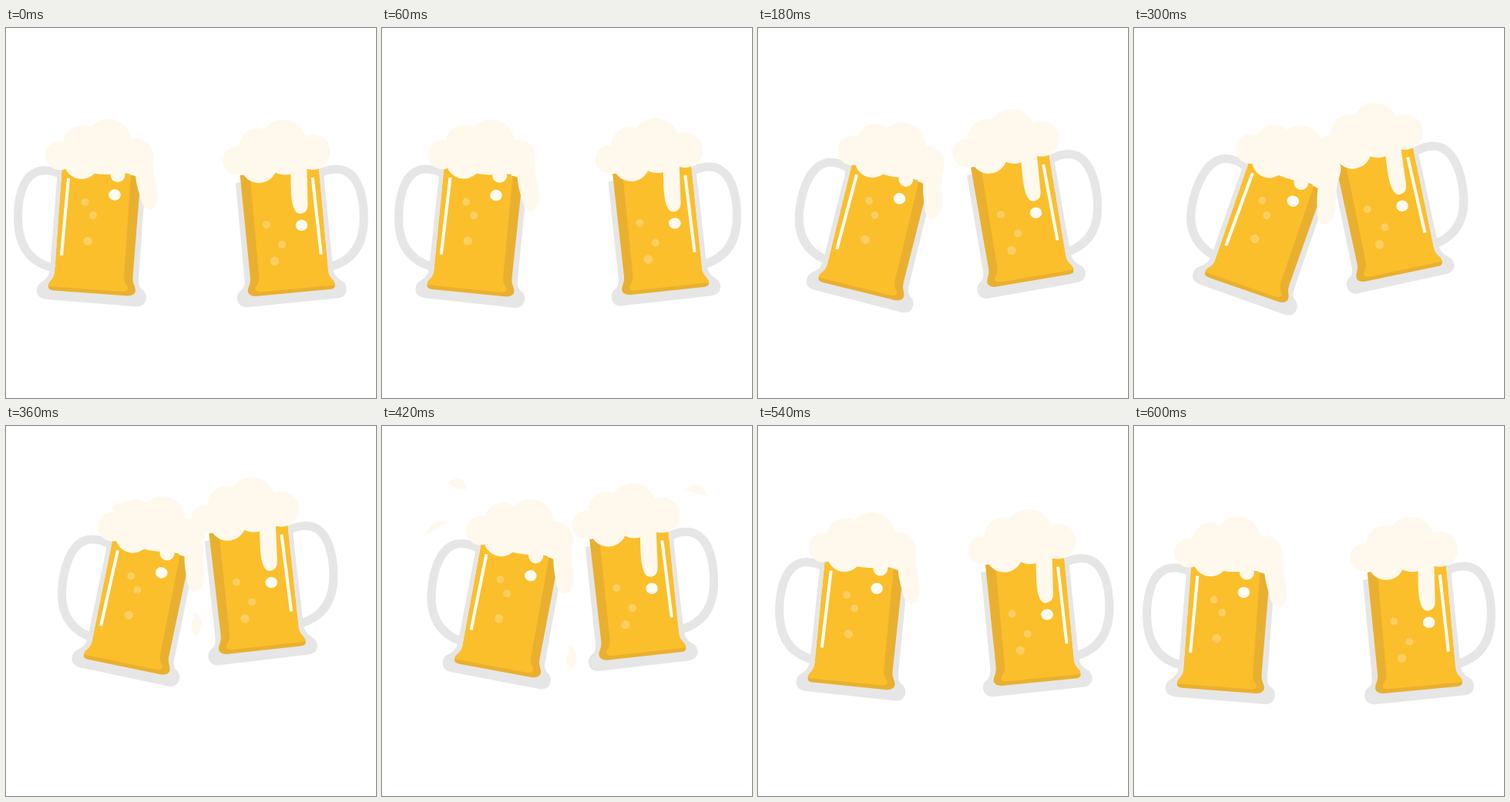
Write an HTML page that moves like this. It is 480 by 480 pixels and loops after 0.63 s.

```html
<!DOCTYPE html>
<html lang="en">
<head>
<meta charset="utf-8">
<title>Cheers</title>
<style>
  html, body { margin: 0; width: 100%; height: 100%; overflow: hidden; background: #fff; }
  svg { display: block; width: 100%; height: 100%; }
  .foam { fill: #fff9ed; }
  .shine { fill: #fffcf5; }
  .bubble { fill: #fdcf63; }
</style>
</head>
<body>
<svg viewBox="0 0 480 480">
  <defs>
    <g id="glass">
      <path d="M72 190C60 184 46 183 37 188C20 197 15 225 15.5 248C16 285 33 304 60 311" fill="none" stroke="#e6e6e6" stroke-width="11"/>
      <path d="M67 183L57 312Q56 324 47 329Q39 333 40 343Q42 351 52 352L170 361.5Q181 361 182 350Q182 343 176 339Q171 335 172 325L181 200Z" fill="#e6e6e6"/>
      <path d="M73 183L63.5 316Q63 323 58 328Q54 332 55 337Q56 340 62 340.5L158 347.5Q167 347 168 341Q168 337 166 333Q164 329 164.5 323L175 190Z" fill="#e9b02f"/>
      <path d="M73 183L63.5 316Q63 323 58 328Q54 332 56 335L151 342Q159 342 158 336Q153 331 153 323L162 190Z" fill="#fbbf2b"/>
      <path d="M81 195L72 295" stroke="#fff" stroke-width="4"/>
    </g>
  </defs>

  <g id="drops" class="foam">
    <path d="M86 74Q92 66 104 69Q108 73 110 82Q95 84 86 74"/>
    <path d="M58 140Q62 126 74 124Q84 124 85 126Q76 127 73 134Q67 135 58 140"/>
    <path d="M391 84Q400 75 411 77Q421 82 424 94Q417 87 407 88Q400 84 391 84"/>
    <path d="M243 284Q251 288 253 300Q251 312 245 316Q238 312 239 300Q243 292 243 284"/>
  </g>

  <g id="right">
    <use href="#glass" transform="translate(399.5 234) rotate(-1.2) translate(80 -235) scale(-1 1)"/>
    <g class="bubble">
      <circle cx="338" cy="255" r="5"/>
      <circle cx="358" cy="281" r="5"/>
      <circle cx="348.5" cy="302.5" r="5.7"/>
    </g>
    <ellipse class="shine" cx="383.5" cy="256" rx="7.8" ry="7.2"/>
    <g class="foam">
      <circle cx="299" cy="172" r="18"/>
      <circle cx="327" cy="155" r="25"/>
      <circle cx="328" cy="177" r="24"/>
      <circle cx="360" cy="149" r="30"/>
      <circle cx="362" cy="163" r="27.5"/>
      <circle cx="398" cy="161" r="23"/>
      <path d="M369 170L369.5 205Q370 241 381.5 241Q392 240 391.500 228L390 170Z"/>
    </g>
  </g>

  <g id="left">
    <use href="#glass"/>
    <g class="bubble">
      <circle cx="102.500" cy="226" r="5"/>
      <circle cx="113" cy="243" r="5"/>
      <circle cx="106" cy="276.500" r="5.700"/>
    </g>
    <ellipse class="shine" cx="141" cy="216.500" rx="7.800" ry="7.200"/>
    <g class="foam">
      <circle cx="70" cy="165.500" r="19"/>
      <circle cx="98" cy="150" r="24"/>
      <circle cx="98" cy="173" r="23"/>
      <circle cx="133" cy="148" r="30"/>
      <ellipse cx="130" cy="170" rx="45" ry="20"/>
      <circle cx="168" cy="166" r="23"/>
      <circle cx="145" cy="190.500" r="9.500"/>
      <path d="M160 190L165 170L191 168C189 190 197 203 197 218Q196 235 186 236Q177 234 174 218Q169 203 168 192Z"/>
    </g>
  </g>
</svg>
<script>
const LOOP = 630, STEP = 30, HIT = 300, RECOIL = 360;
const byId = id => document.getElementById(id);

// Offsets from rest as [dx, dy, degrees] around the pivot
const mugs = [
  { el: byId('left'), pivot: [106, 276], hit: [51, -3, 15], recoil: [53.3, -31.2, 7.4] },
  { el: byId('right'), pivot: [348.5, 302.5], hit: [-30, -21.5, -6.5], recoil: [-38.5, -52.5, -0.9] }
];
const drops = byId('drops');
const burst = [250, 170];
const centers = [[97, 74], [71, 131], [407, 85], [245, 299]];

const ease = u => u * u * (3 - 2 * u);

function pose({ hit, recoil }, t) {
  if (t <= HIT) return hit.map(v => v * ease(t / HIT));
  if (t <= RECOIL) {
    const k = ease((t - HIT) / (RECOIL - HIT));
    return hit.map((v, i) => v + (recoil[i] - v) * k);
  }
  const k = ease(((LOOP - t) / (LOOP - RECOIL)) ** 1.1);
  return recoil.map(v => v * k);
}

function draw(now) {
  const t = Math.floor((now % LOOP) / STEP) * STEP;
  for (const mug of mugs) {
    const [dx, dy, angle] = pose(mug, t);
    mug.el.setAttribute('transform', `translate(${dx} ${dy}) rotate(${angle} ${mug.pivot})`);
  }

  const flying = t > HIT && t < 480;
  drops.style.display = flying ? '' : 'none';
  if (flying) {
    const spread = (1 - (1 - (t - HIT) / 150) ** 2) / 0.96;
    centers.forEach(([x, y], i) => drops.children[i].setAttribute('transform',
      `translate(${(x - burst[0]) * (spread - 1)} ${(y - burst[1]) * (spread - 1)})`));
  }
}

function tick() {
  draw(performance.now());
  requestAnimationFrame(tick);
}
tick();
</script>
</body>
</html>
```
